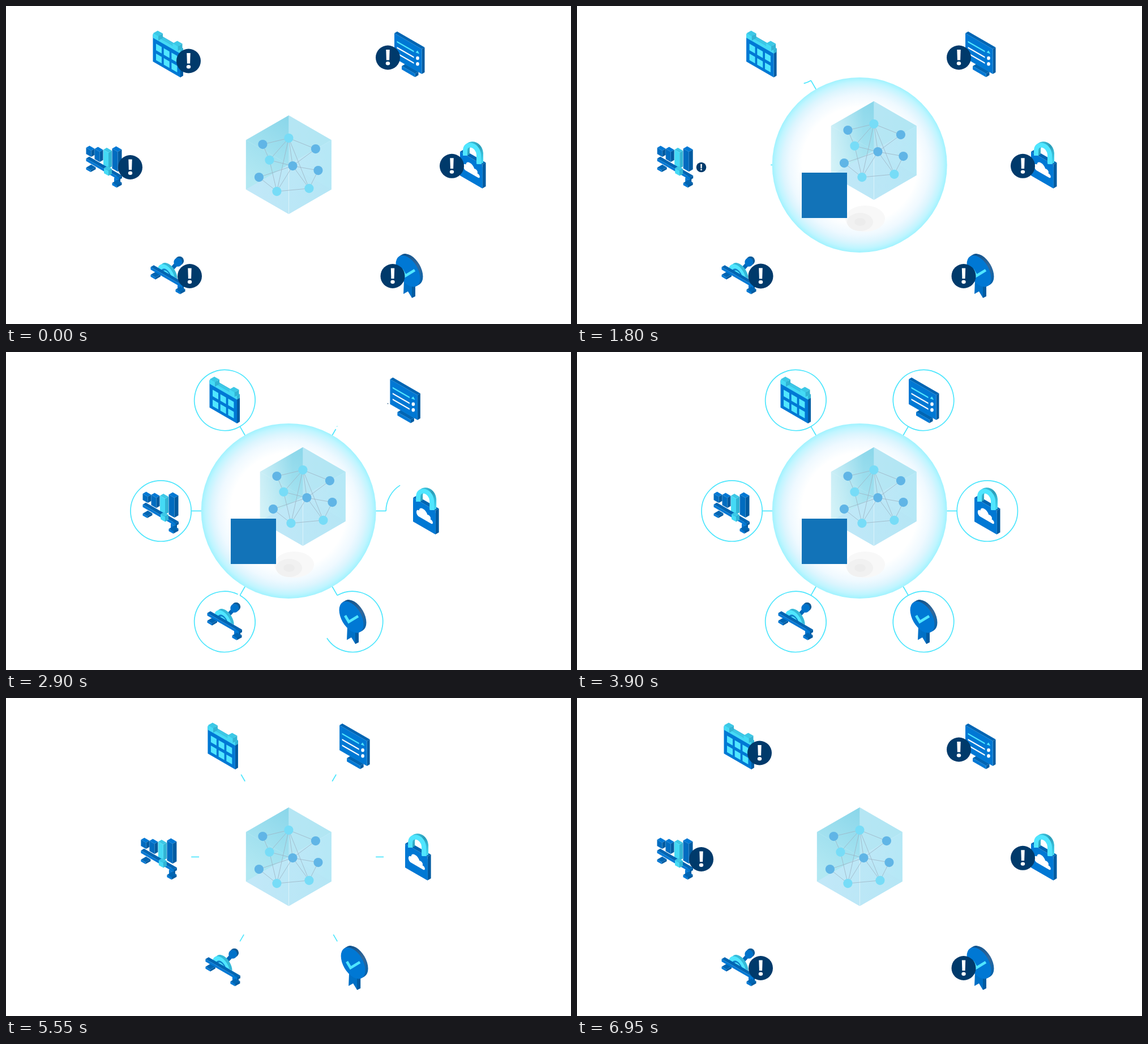
Recreate the animation shown at these times as an HTML page with a canvas. Size 998 by 561 pixels, loop 7 s.

```html
<!DOCTYPE html>
<html lang="en">
<head>
<meta charset="utf-8">
<style>
html, body { margin: 0; width: 100%; height: 100%; overflow: hidden; background: #fff; }
canvas { display: block; }
</style>
</head>
<body>
<canvas id="stage" width="998" height="561"></canvas>
<script>
const c = document.getElementById('stage').getContext('2d');
const LOOP = 7000, TAU = Math.PI * 2, CX = 499.2, CY = 280.4, SLOPE = 0.577;
const CYAN = '#4ce6fd';
const BLUE = { front: '#0078d4', top: '#0065b3', side: '#005ba1' };
const DEEP = { front: '#006cc0', top: '#0078d4', side: '#005ba1' };
const TEAL = { front: '#45daf5', top: '#3cc8e6', side: '#32b4d4' };

const clamp = x => Math.max(0, Math.min(1, x));
const cubic = u => u < 0.5 ? 4 * u ** 3 : 1 - 4 * (1 - u) ** 3;
const back = u => u * u * (2.7 * u - 1.7);
const span = (t, start, length) => clamp((t - start) / length);
const ease = (t, start, length) => cubic(span(t, start, length));

function poly(points, fill) {
  c.beginPath();
  points.forEach(([x, y]) => c.lineTo(x, y));
  c.closePath();
  c.fillStyle = fill;
  c.fill();
}

function stroke(points, color, width) {
  c.beginPath();
  points.forEach(([x, y]) => c.lineTo(x, y));
  c.strokeStyle = color;
  c.lineWidth = width;
  c.stroke();
}

function oval(x, y, rx, ry, fill) {
  c.beginPath();
  c.ellipse(x, y, rx, ry, 0, 0, TAU);
  c.fillStyle = fill;
  c.fill();
}

// Isometric box: front face slopes down to the right, depth goes up to the right
function box(x, y, w, h, d, tone) {
  const r = x + w, yr = y + w * SLOPE, k = d * SLOPE;
  poly([[x, y], [x + d, y - k], [r + d, yr - k], [r, yr]], tone.top);
  poly([[r, yr], [r + d, yr - k], [r + d, yr - k + h], [r, yr + h]], tone.side);
  poly([[x, y], [r, yr], [r, yr + h], [x, y + h]], tone.front);
}

function slab(x, y, w, h, fill) {
  poly([[x, y], [x + w, y + w * SLOPE], [x + w, y + w * SLOPE + h], [x, y + h]], fill);
}

// Draws in the plane of the front faces, around (x, y)
function onFace(x, y, draw) {
  c.save();
  c.transform(0.866, 0.5, 0, 1, x, y);
  draw();
  c.restore();
}

function ramp(x0, y0, x1, y1, ...colors) {
  const g = c.createLinearGradient(x0, y0, x1, y1);
  colors.forEach((col, i) => g.addColorStop(i / (colors.length - 1), col));
  return g;
}

function calendar() {
  box(359.5, 50, 48.5, 48, 5, BLUE);
  box(359.5, 50, 48.5, 6, 5, TEAL);
  box(360, 48, 9, 8, 8, TEAL);
  box(394.5, 66, 9, 8, 8, TEAL);
  for (let i = 0; i < 6; i++) {
    const x = 365 + (i % 3) * 13.7;
    slab(x, 66.5 + (x - 365) * SLOPE + (i > 2 ? 17.5 : 0), 10, 11.5, '#50e6ff');
  }
}

function chart() {
  box(241.5, 285, 8, 3.5, 9, BLUE);
  box(241.5, 250, 9, 11, 6, DEEP);
  box(256.5, 252, 9, 18, 6, DEEP);
  box(272, 253.5, 9, 28, 6, TEAL);
  box(287.5, 251.5, 10, 35, 7, DEEP);
  box(291, 303, 6, 12, 5, BLUE);
  box(287.5, 312, 8, 4, 9, BLUE);
  box(241.5, 269, 58, 4.5, 5.5, BLUE);
  box(273, 286, 8, 9, 6, TEAL);
}

function gauge() {
  box(355.5, 474, 8.5, 3.5, 9, BLUE);
  stroke([[390, 467], [403, 453]], '#0067b8', 7);
  oval(406.5, 449.5, 7.7, 7.7, '#0f5a96');
  oval(403.7, 452, 7.4, 7.7, '#0072ca');
  box(403, 491, 6, 12, 5, BLUE);
  box(399.5, 500, 8, 4, 9, BLUE);
  const half = r => { c.beginPath(); c.arc(0, 0, r, Math.PI, TAU); };
  onFace(387.5, 472.5, () => { half(17.5); c.fillStyle = '#35b9d8'; c.fill(); });
  onFace(383, 475, () => {
    half(17.5);
    c.fillStyle = '#50e6ff';
    c.fill();
    half(9);
    c.strokeStyle = '#0f7fc8';
    c.lineWidth = 3;
    c.stroke();
  });
  box(355.5, 460.5, 56, 4.5, 5.5, BLUE);
}

function medal() {
  poly([[603, 484], [602, 508], [610, 503.5], [617, 515], [623, 512], [623, 486]], '#0070c6');
  poly([[617, 490], [617, 515], [623, 512], [623, 486]], '#005ba1');
  for (let i = 0; i < 6; i++) {
    onFace(615 - i, 464.8 + i * SLOPE, () =>
      oval(0, 0, 24.8, 24.8, i < 5 ? ramp(-15, -24, 22, 16, '#0a4f8a', '#33689a', '#0063af') : BLUE.front));
  }
  stroke([[599, 465], [605.5, 476], [622, 466]], '#50e6ff', 4.6);
}

function lock() {
  const shackle = (x, y, color) => {
    c.beginPath();
    c.moveTo(711 + x, 264 + y);
    c.lineTo(711 + x, 255 + y);
    c.bezierCurveTo(711 + x, 240 + y, 733 + x, 243 + y, 735 + x, 262 + y);
    c.lineTo(735 + x, 279 + y);
    c.strokeStyle = color;
    c.lineWidth = 8;
    c.stroke();
  };
  box(702, 257, 39.5, 42, 6, BLUE);
  for (let i = 4; i >= 0; i--) {
    shackle(i, -i * SLOPE, i ? ramp(712, 240, 742, 272, '#42cfe8', '#2a9cb8', '#42d4ee') : '#50e6ff');
  }
  slab(702, 261.5, 39.5, 37.5, BLUE.front);
  onFace(722, 291, () => {
    c.fillStyle = '#fff';
    c.beginPath();
    c.moveTo(-12, 5);
    c.bezierCurveTo(-18, 4, -18, -6, -11, -6);
    c.bezierCurveTo(-10, -15, 3, -15, 6, -7);
    c.bezierCurveTo(12, -9, 14, -4, 12, -2);
    c.bezierCurveTo(19, -2, 18, 5, 14, 5);
    c.closePath();
    c.fill();
  });
}

function monitor() {
  box(599, 106, 23.5, 6, 6, BLUE);
  box(586, 48, 48.5, 44, 5, BLUE);
  ['#50e6ff', '#fff', '#fff'].forEach((color, i) => {
    const y = 61.7 + i * 10.3;
    slab(590.5, y, 30, 2.5, color);
    if (i) oval(627, y + 20, 2.8, 3.2, color);
    else poly([[627, 78.5], [630.2, 84.5], [623.5, 82]], color);
  });
}

// Order of appearance; x, y is the alert badge
const items = [
  { draw: calendar, x: 322.5, y: 97, dir: -1 },
  { draw: chart, x: 219.5, y: 284.5, dir: -1 },
  { draw: gauge, x: 324.5, y: 476.5, dir: -1 },
  { draw: medal, x: 683, y: 476.5, dir: 1 },
  { draw: lock, x: 787.5, y: 282.3, dir: 1 },
  { draw: monitor, x: 674.5, y: 91, dir: 1 }
];

function badge({ x, y }, scale) {
  if (scale <= 0) return;
  c.save();
  c.translate(x, y);
  c.scale(scale, scale);
  oval(0, 0, 21.5, 21.5, '#003a6b');
  poly([[-3.2, -14], [3.2, -14], [2.6, 4.6], [-2.6, 4.6]], '#fff');
  oval(0, 10.3, 3.7, 3.2, '#fff');
  c.restore();
}

// A spoke that grows outwards, then a ring drawn clockwise from its end
function connector(t, i) {
  const angle = (240 - 60 * i) * TAU / 360, cos = Math.cos(angle), sin = Math.sin(angle);
  const inner = 154, outer = 172, r = 53.6, hub = outer + r, delay = 245 * i;
  const cut = (outer - inner) * ease(t, 5420, 340);
  const keepOuter = i > 0 && i < 4;
  const from = inner + (keepOuter ? cut : 0);
  const to = inner + (outer - inner) * span(t, 1520 + delay, 220) - (keepOuter ? 0 : cut);
  if (to > from) {
    stroke([[CX + cos * from, CY + sin * from], [CX + cos * to, CY + sin * to]], CYAN, 1.7);
  }
  const sweep = ease(t, 1595 + delay, 953) * (1 - ease(t, 4870, 570));
  if (sweep > 0) {
    c.beginPath();
    c.arc(CX + cos * hub, CY + sin * hub, r, angle + Math.PI, angle + Math.PI + TAU * sweep);
    c.strokeStyle = CYAN;
    c.lineWidth = 1.7;
    c.stroke();
  }
}

function sphere(alpha) {
  if (!alpha) return;
  c.globalAlpha = alpha;
  const g = c.createRadialGradient(CX, CY, 0, CX, CY, 154.5);
  [[0, '#fff'], [0.66, '#fff'], [0.8, '#eff9ff'], [0.88, '#dcf5fe'], [0.95, '#c0f5ff'], [1, '#a0f3ff']]
    .forEach(([at, color]) => g.addColorStop(at, color));
  oval(CX, CY, 154.5, 154.5, g);
  oval(509, 375, 35, 23, '#f8f8f8');
  oval(500, 381, 23, 16, '#f1f1f1');
  oval(500, 381, 10, 7, '#ececec');
  c.globalAlpha = 1;
}

const nodes = [[-46, -36], [0, -47], [47.5, -28], [-34, -8.3], [7, 2], [52, 10], [-52.5, 22], [-21, 47], [36, 41.7]];
const links = '01 12 13 14 17 18 03 37 34 24 46 47 48 45 58 78 67'.split(' ');

function cube(shift, glow) {
  const w = 75.5, h = 43.5;
  const left = [[0, -87], [0, 0], [-w, h], [-w, -h]];
  c.save();
  c.translate(499.4 + shift, 280.1 - shift);
  poly([[0, -87], [w, -h], [w, h], [0, 87], [-w, h], [-w, -h]], ramp(-w, 0, w, 0, '#b4e6f4', '#bfe7f7', '#b5e8f6'));
  poly(left, ramp(8, -75, -62, 30, '#8bd7ea', '#a0e0ef', '#b2e8f2'));
  poly([[0, 0], [w, h], [0, 87], [-w, h]], ramp(-w, 0, w, 0, '#c2e8f8', '#b5e6f5'));
  poly([[0, -87], [w, -h], [0, 0]], 'rgba(174,229,242,.5)');
  poly(left, ramp(-w, 0, -18, 0, `rgba(255,255,255,${0.45 * glow})`, 'rgba(255,255,255,0)'));
  stroke([[-w, -h], [0, 0], [w, -h]], 'rgba(255,255,255,.13)', 1);
  stroke([[0, 0], [0, 87]], 'rgba(255,255,255,.5)', 1);
  links.forEach(l => stroke([nodes[l[0]], nodes[l[1]]], '#9db4c4', 0.8));
  nodes.forEach(([x, y], i) => oval(x, y, 8.1, 8.1, [1, 3, 7, 8].includes(i) ? '#77dcf7' : '#60b5e6'));
  c.restore();
}

function tile(p) {
  c.globalAlpha = p;
  c.fillStyle = '#1273b8';
  c.fillRect(397 - 9 * (1 - p), 294 + 42 * (1 - p), 80, 80);
  c.globalAlpha = 1;
}

function render(t) {
  c.fillStyle = '#fff';
  c.fillRect(0, 0, 998, 561);
  items.forEach((_, i) => connector(t, i));
  const glow = ease(t, 1000, 450) - ease(t, 4250, 450);
  sphere(glow);
  const p = ease(t, 521, 800) - ease(t, 4370, 800);
  cube(25 * p, glow);
  tile(p);
  items.forEach((item, i) => {
    const away = 1 - ease(t, 1505 + 245 * i, 640) + ease(t, 5450, 510);
    c.save();
    c.translate(100 * item.dir * away, 0);
    item.draw();
    c.restore();
    const shrink = 1 - back(span(t, 1219 + 267 * i, 350));
    const grow = 1 - back(1 - span(t, 6000, 350));
    badge(item, t < 6000 ? shrink : grow);
  });
}

function tick(now) {
  render(now % LOOP);
  requestAnimationFrame(tick);
}
requestAnimationFrame(tick);
</script>
</body>
</html>
```
